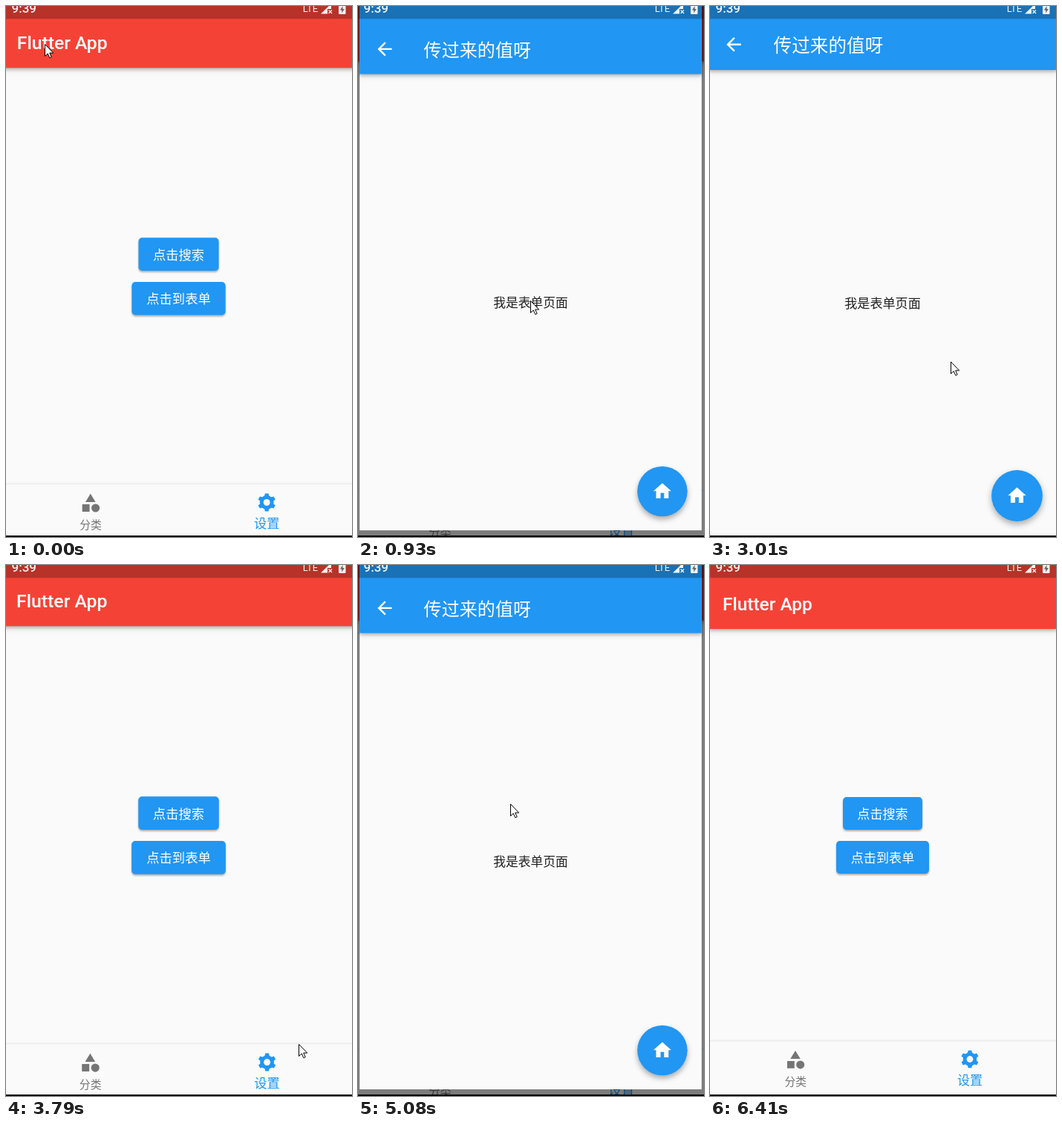
Animation of 466 by 714 pixels, one loop 6970 ms. Source, as an HTML page:

```html
<!DOCTYPE html>
<html lang="zh-CN">
<head>
<meta charset="utf-8">
<title>Page transitions</title>
<style>
html, body { margin: 0; width: 100%; height: 100%; overflow: hidden; background: #fafafa; }
svg { display: block; }
text { font: 17.1px "Noto Sans CJK SC", "Noto Sans CJK", sans-serif; }
.latin { font-family: Roboto, sans-serif; fill: #fff; }
.title { font-size: 24.47px; }
.mid { text-anchor: middle; }
.white { fill: #fff; }
.blue { fill: #2196f3; }
.grey { fill: #757575; }
.bg { fill: #fafafa; }
.bar { filter: drop-shadow(0 2px 2px rgba(0,0,0,.22)) drop-shadow(0 2px 4px rgba(0,0,0,.14)); }
.btn { filter: drop-shadow(0 2px 1.2px rgba(0,0,0,.3)); }
.btn.down { filter: drop-shadow(0 4px 3px rgba(0,0,0,.38)); }
.fab { filter: drop-shadow(0 4px 4px rgba(0,0,0,.32)); }
.nav { filter: drop-shadow(0 -1px 1px rgba(0,0,0,.09)); }
</style>
</head>
<body>
<svg width="466" height="714" viewBox="0 0 466 714">
  <g id="home">
    <rect class="bg" x="-2.5" y="-20" width="470" height="732"/>
    <rect class="bar" x="-2.5" y="-20" width="470" height="106" fill="#f44336"/>
    <text class="latin title" x="17" y="60.7" font-weight="500" style="font-weight:500">Flutter App</text>

    <rect id="search" class="blue btn" x="179" y="312" width="107" height="44" rx="4.9"/>
    <rect id="searchInk" class="white" x="179" y="312" width="107" height="44" rx="4.9"/>
    <text class="white mid" x="232.5" y="341">点击搜索</text>
    <rect id="form" class="blue btn" x="170" y="371" width="125" height="44" rx="4.9"/>
    <rect id="formInk" class="white" x="170" y="371" width="125" height="44" rx="4.9"/>
    <text class="white mid" x="232.5" y="400">点击到表单</text>

    <rect class="bg nav" x="-2.5" y="640.5" width="470" height="71.5"/>
    <g class="grey" transform="translate(100.3 650.5) scale(1.223)">
      <path d="M12 2l-5.5 9h11zM3 13.5h8v8H3z"/>
      <circle cx="17.5" cy="17.5" r="4.5"/>
    </g>
    <text class="grey mid" x="115.3" y="699.6" style="font-size:14.7px">分类</text>
    <g class="blue" transform="translate(350 664.5) scale(1.223)">
      <circle r="7.6"/>
      <g id="teeth"></g>
      <circle class="bg" r="3.6"/>
    </g>
    <text class="blue mid" x="350" y="698.5">设置</text>
  </g>

  <g id="over">
    <rect width="466" height="714" opacity=".5"/>
    <g id="detail">
      <rect class="bg" x="-2.5" y="-20" width="470" height="732"/>
      <rect class="blue bar" x="-2.5" y="-20" width="470" height="106"/>
      <circle id="backInk" class="white" cx="32" cy="51.7" r="25"/>
      <path class="white" transform="translate(17.3 37) scale(1.223)"
        d="M20 11H7.83l5.59-5.59L12 4l-8 8 8 8 1.41-1.41L7.83 13H20z"/>
      <text class="white title" x="85.600" y="61.5" letter-spacing=".15">传过来的值呀</text>
      <text class="mid" x="232.5" y="405.7" fill="#000" fill-opacity=".87">我是表单页面</text>
      <circle class="blue fab" cx="413.5" cy="658.5" r="34.4"/>
      <circle id="fabInk" class="white" cx="413.5" cy="658.5" r="34.4"/>
      <path class="white" transform="translate(398.8 643.5) scale(1.223)"
        d="M10 20v-6h4v6h5v-8h3L12 3 2 12h3v8z"/>
    </g>
  </g>

  <rect width="466" height="17.3" opacity=".25"/>
  <g class="white" opacity=".93">
    <text class="latin" x="7.5" y="9.2" style="font-size:17px;font-weight:500">9:39</text>
    <text class="latin" x="399.7" y="8" style="font-size:13px">LTE</text>
    <path d="M424 10.5L438-3V4h-5v6.5z"/>
    <path d="M434.5 5.5l4.500 4.500m0-4.500l-4.500 4.500" stroke="#fff" stroke-width="1.4"/>
    <rect x="448" y="-1" width="9.5" height="12" rx="1"/>
  </g>
  <path d="M453.5 0l-3.5 5.5h2.300V9.500l3.500-5.500h-2.300z" opacity=".6"/>
  <rect y="712" width="466" height="2"/>
  <path id="cursor" fill="#fff" stroke="#000"
    d="M.5.5v16l3.700-3.500 2.600 5.700 2.400-1-2.500-5.600h5z"/>
</svg>
<script>
const LOOP = 6970, END = 6410, STEP = 135;
const $ = id => document.getElementById(id);

// Turning points of the pointer: time, x, y
const path = [
  [0, 52, 51], [240, 170, 253], [510, 232, 396], [930, 232, 396], [1050, 232, 396],
  [1320, 196, 146], [1590, 113, 34], [1740, 65, 67], [1890, 217, 70], [2010, 153, 36],
  [2160, 64, 52], [2430, 40, 59], [2990, 36, 59], [3010, 324, 478], [3520, 394, 644],
  [3790, 394, 644], [4180, 248, 384], [4450, 71, 102], [4690, 205, 321],
  [5080, 205, 321], [5470, 59, 94], [5770, 36, 43], [6170, 36, 43], [END, 36, 43]
];
const pushes = [[930, 3790], [5080, 6170]];          // detail page on screen
const pops = [[0, .01], [3790, .0135], [6170, .02]]; // home page settling, extra scale

for (let a = 0; a < 360; a += 60)
  $('teeth').innerHTML += `<path transform="rotate(${a})" d="M-1.9-9.7h3.8l.8 4h-5.400z"/>`;

// The screen refreshes in even steps of about STEP ms between turning points.
function sample(clock) {
  const i = path.findLastIndex(p => p[0] <= clock);
  const a = path[i], b = path[i + 1];
  if (!b) return a;
  const span = b[0] - a[0];
  const n = Math.max(1, Math.round(span / STEP));
  const u = Math.floor((clock - a[0]) / span * n) / n;
  return a.map((v, k) => Math.round(v + (b[k] - v) * u));
}

const settle = (dt, tau, end) => dt < end ? Math.exp(-dt / tau) : 0;

function zoom(id, s) {
  $(id).setAttribute('transform', `translate(232.5 364) scale(${s}) translate(-232.5 -364)`);
}

function ink(id, t, from, to) {
  const on = t >= from && t < to;
  $(id + 'Ink').setAttribute('opacity', on ? (t - from < 100 ? .1 : .17) : 0);
  if ($(id)) $(id).classList.toggle('down', on);
}

function draw(now) {
  const [t, x, y] = sample(now % LOOP);
  const push = pushes.find(([a, b]) => t >= a && t < b);
  const [popAt, extra] = pops.findLast(p => p[0] <= t);

  zoom('home', push ? 1.041 : 1 + extra * settle(t - popAt, 100, 240));
  $('over').style.display = push ? '' : 'none';
  if (push) zoom('detail', 1 - .02 * settle(t - push[0], 120, 390));

  ink('form', t, 640, 930);
  ink('search', t, 4810, 5080);
  ink('fab', t, 3650, 3790);
  ink('back', t, 6030, 6170);

  $('cursor').setAttribute('transform', `translate(${x} ${y})`);
  $('cursor').style.display = t < END ? '' : 'none';
}

const start = performance.now();
(function tick() {
  draw(performance.now() - start);
  requestAnimationFrame(tick);
})();
</script>
</body>
</html>
```
